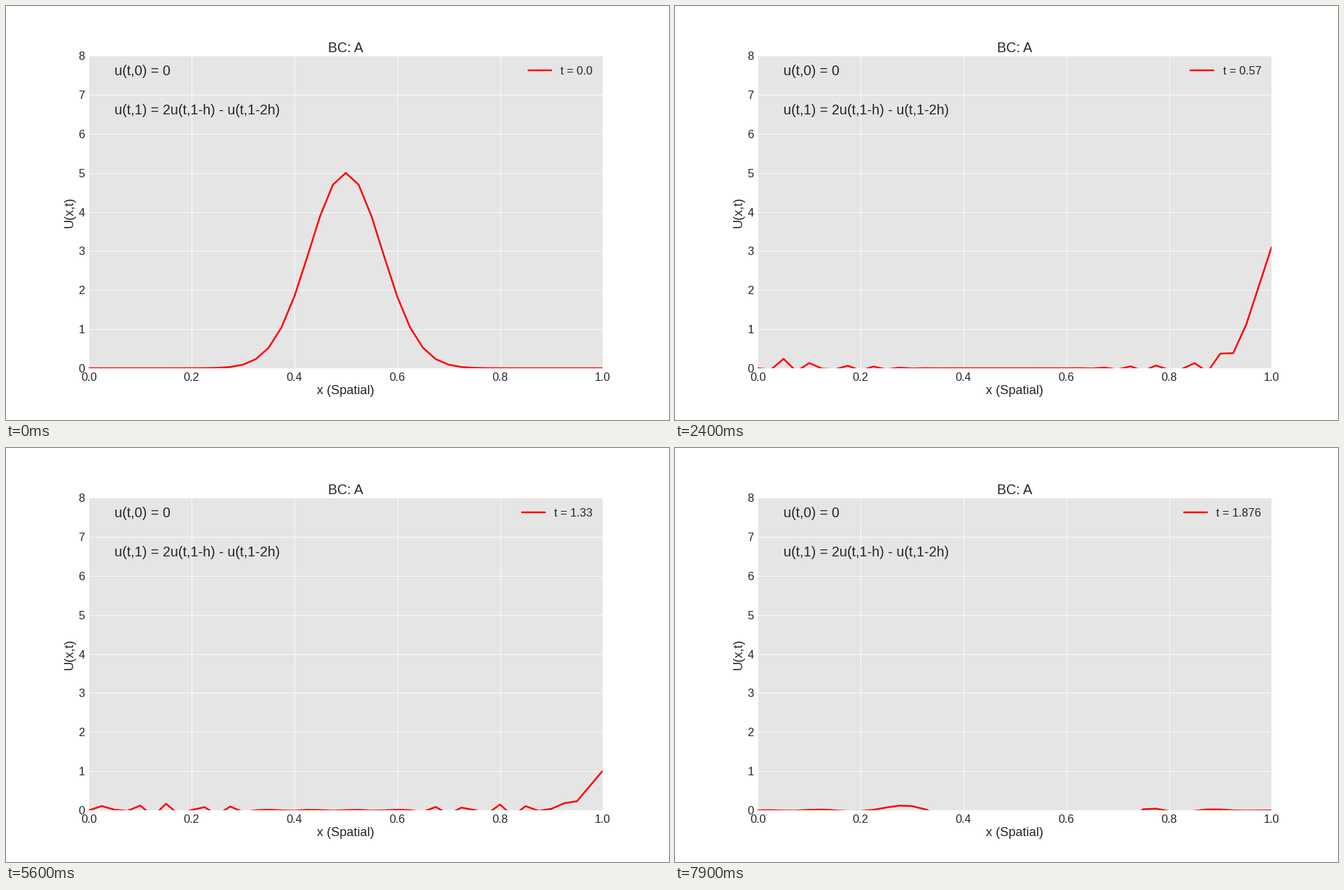
A matplotlib script that plays this animation: 947 by 592 pixels, repeating every 8 s.

```python
import numpy as np
import matplotlib.pyplot as plt
from matplotlib.animation import FuncAnimation

W, H, DPI = 947, 592, 64
INK = "0.15"


def pt(size):
    """Points on a 16 inch wide sheet, scaled to this figure."""
    return size * W / 16 / DPI


# Advection u_t + u_x = 0, leapfrog scheme with one Euler step to start
STEPS = 80
h = 1 / 40
r = 0.95
dt = r * h
x = np.linspace(0, 1, 41)


def close_ends(v):
    v[0] = 0
    v[-1] = 2 * v[-2] - v[-3]


def solve():
    u = np.zeros((STEPS, x.size))
    u[0] = 5 * np.exp(-100 * (x - 0.5) ** 2)
    for n in range(1, STEPS):
        slope = u[n - 1, 2:] - u[n - 1, :-2]
        if n == 1:
            u[n, 1:-1] = u[0, 1:-1] - r / 2 * slope
        else:
            u[n, 1:-1] = u[n - 2, 1:-1] - r * slope
        close_ends(u[n])
    return u


def clock():
    times, t = [], 0.0
    for _ in range(STEPS):
        times.append(t)
        t += dt
    return times


u = solve()
labels = [f"t = {round(t, 3)}" for t in clock()]

plt.rcParams.update({
    "font.family": "Liberation Sans",
    "text.color": INK,
    "axes.labelcolor": INK,
    "xtick.color": INK,
    "ytick.color": INK,
    "lines.solid_capstyle": "round",
})

fig = plt.figure(figsize=(W / DPI, H / DPI), dpi=DPI, facecolor="white")
ax = fig.add_axes([0.125, 0.125, 0.775, 0.755], facecolor="#e5e5e5")
ax.set(xlim=(0, 1), ylim=(0, 8))
ax.set_xticks(np.linspace(0, 1, 6))
ax.set_yticks(range(9))
ax.set_axisbelow(True)
ax.grid(color="white", linewidth=pt(1))
ax.tick_params(length=0, pad=pt(7), labelsize=pt(20))
for spine in ax.spines.values():
    spine.set_visible(False)

ax.set_title("BC: A", fontsize=pt(24), pad=pt(6))
ax.set_xlabel("x (Spatial)", fontsize=pt(22), labelpad=pt(4))
ax.set_ylabel("U(x,t)", fontsize=pt(22), labelpad=pt(4))
ax.text(0.05, 7.5, "u(t,0) = 0", fontsize=pt(24))
ax.text(0.05, 6.5, "u(t,1) = 2u(t,1-h) - u(t,1-2h)", fontsize=pt(24))

line, = ax.plot(x, u[0], color="red", linewidth=pt(3), label=labels[0])
legend = ax.legend(loc="upper right", fontsize=pt(20), frameon=False)
time_text = legend.get_texts()[0]


def draw(n):
    line.set_ydata(u[n])
    time_text.set_text(labels[n])
    return line, time_text


anim = FuncAnimation(fig, draw, frames=STEPS, interval=100,
                     repeat=True, repeat_delay=0, blit=False)
plt.show()
```
